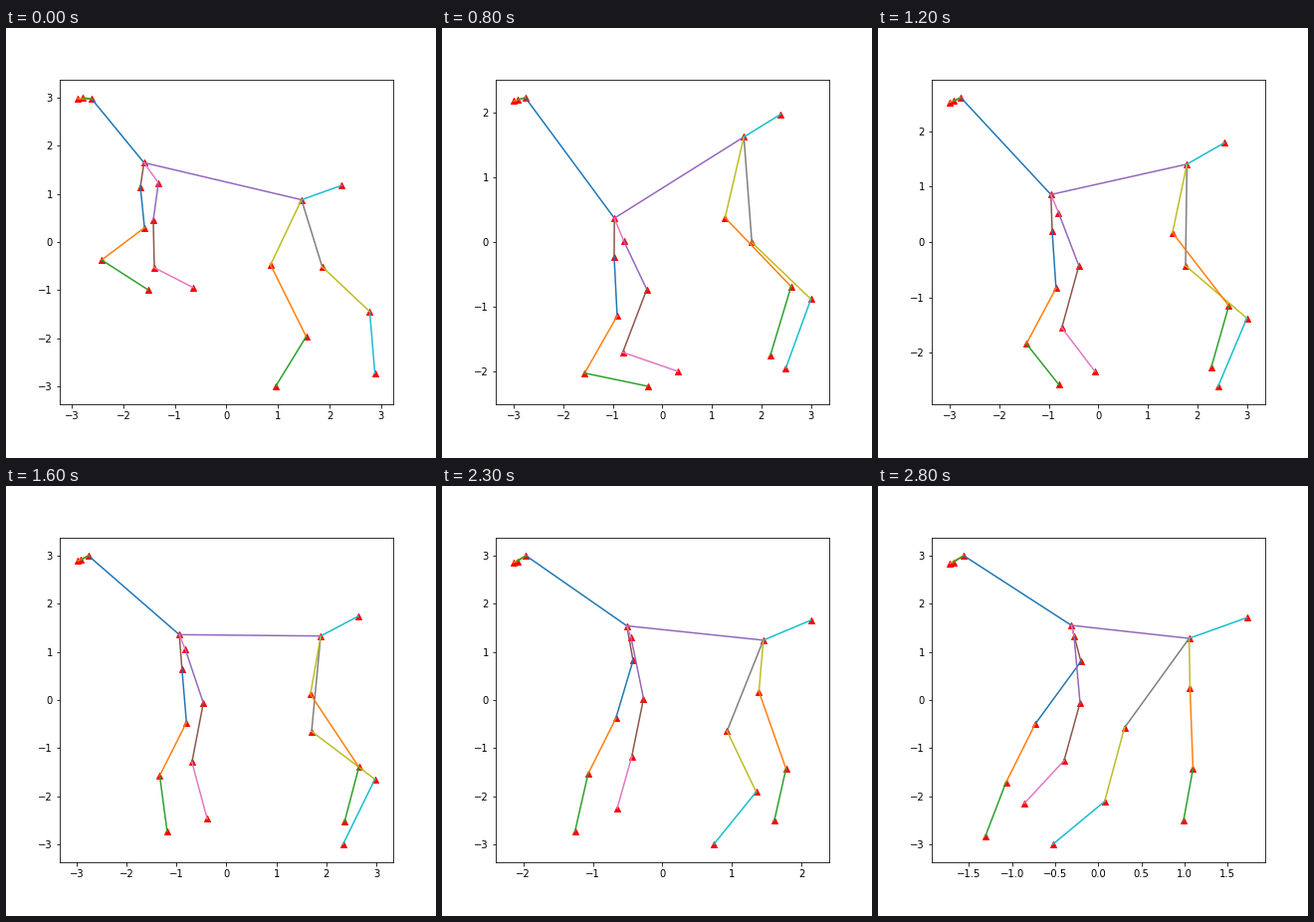
Recreate the animation shown at these times as a matplotlib script. Size 432x432 px, loop 2.9 s.

```python
import numpy as np
import matplotlib.pyplot as plt
from matplotlib.animation import FuncAnimation

FRAMES = 29
STRIDE = [0, 8, 19, 28]  # frames at which the gait turns

# joint, parent, line colour, then where the bone points: either a plain
# drift from first to last, or one vector for each turn of the gait.
BONES = [
    ("head", "withers", 0, (-1.01, 1.32), (-1.78, 1.84), (-1.69, 1.47), (-1.25, 1.45)),
    ("nose", "head", 1, (-.27, .01), (-.16, -.16)),
    ("eye", "head", 2, (-.17, .03), (-.12, -.14)),
    ("hip", "withers", 4, (3.05, -.77), (2.59, 1.24), (2.67, -.33), (1.365, -.27)),
    ("elbow_a", "withers", 5, (-.07, -.5), (.11, -.75)),
    ("elbow_b", "withers", 6, (.28, -.42), (.03, -.22)),
    ("knee_d", "hip", 7, (.4, -1.39), (.16, -1.61), (-.25, -1.92), (-.75, -1.86)),
    ("knee_c", "hip", 8, (-.6, -1.35), (.01, -1.03)),
    ("tail", "hip", 9, (.78, .3), (.67, .43)),
    ("wrist_a", "elbow_a", 0, (.08, -.85), (.06, -.9), (.09, -1.08), (-.53, -1.3)),
    ("ankle_a", "wrist_a", 1, (-.83, -.67), (-.34, -1.22)),
    ("paw_a", "ankle_a", 2, (.9, -.62), (1.26, -.2), (-.13, -1.3), (-.24, -1.12)),
    ("wrist_b", "elbow_b", 4, (-.1, -.77), (.46, -.74), (.31, -1.12), (.07, -1.39)),
    ("ankle_b", "wrist_b", 5, (.02, -.99), (-.48, -.96), (-.15, -1.2), (-.185, -1.2)),
    ("paw_b", "ankle_b", 6, (.75, -.41), (1.1, -.29), (.09, -1.3), (-.46, -.89)),
    ("hock_d", "knee_d", 8, (.92, -.93), (1.18, -.865), (1.19, -.95), (-.23, -1.53)),
    ("paw_d", "hock_d", 9, (.1, -1.28), (-.5, -1.05), (-.62, -1.32), (-.6, -.89)),
    ("hock_c", "knee_c", 1, (.69, -1.49), (1.32, -1.05), (.81, -1.51), (.035, -1.68)),
    ("paw_c", "hock_c", 2, (-.59, -1.03), (-.11, -1.08)),
]


def bone_vector(keys, t):
    """Move from key to key, each time a little faster at the start."""
    times = STRIDE if len(keys) > 2 else [STRIDE[0], STRIDE[-1]]
    k = min(np.searchsorted(times, t, side="right"), len(times) - 1)
    u = (t - times[k - 1]) / (times[k] - times[k - 1])
    u += 0.4 * u * (1 - u)
    return (1 - u) * np.array(keys[k - 1]) + u * np.array(keys[k])


def pose(t):
    """Joint positions, centred and scaled so the widest reach is 3."""
    joints = {"withers": np.zeros(2)}
    for joint, parent, _, *keys in BONES:
        joints[joint] = joints[parent] + bone_vector(keys, t)
    points = np.array(list(joints.values()))
    low, high = points.min(axis=0), points.max(axis=0)
    scale = 6 / (high - low).max()
    return {j: (p - (low + high) / 2) * scale for j, p in joints.items()}


fig, ax = plt.subplots(figsize=(6, 6), dpi=72, facecolor="white")
fig.subplots_adjust(left=0.125, right=0.9, bottom=0.125, top=0.88)


def draw(frame):
    ax.clear()
    joints = pose(frame)
    points = np.array(list(joints.values()))
    ax.scatter(*points.T, marker="^", c="r")
    for joint, parent, colour, *_ in BONES:
        ax.plot(*np.transpose([joints[parent], joints[joint]]), color=f"C{colour}")
    half_x, half_y = points.max(axis=0)
    ax.set_xlim(-1.122 * half_x, 1.122 * half_x)
    ax.set_ylim(-1.125 * half_y, 1.125 * half_y)
    return []


anim = FuncAnimation(fig, draw, frames=FRAMES, interval=100,
                     init_func=lambda: [], repeat=True, repeat_delay=0)
plt.show()
```
